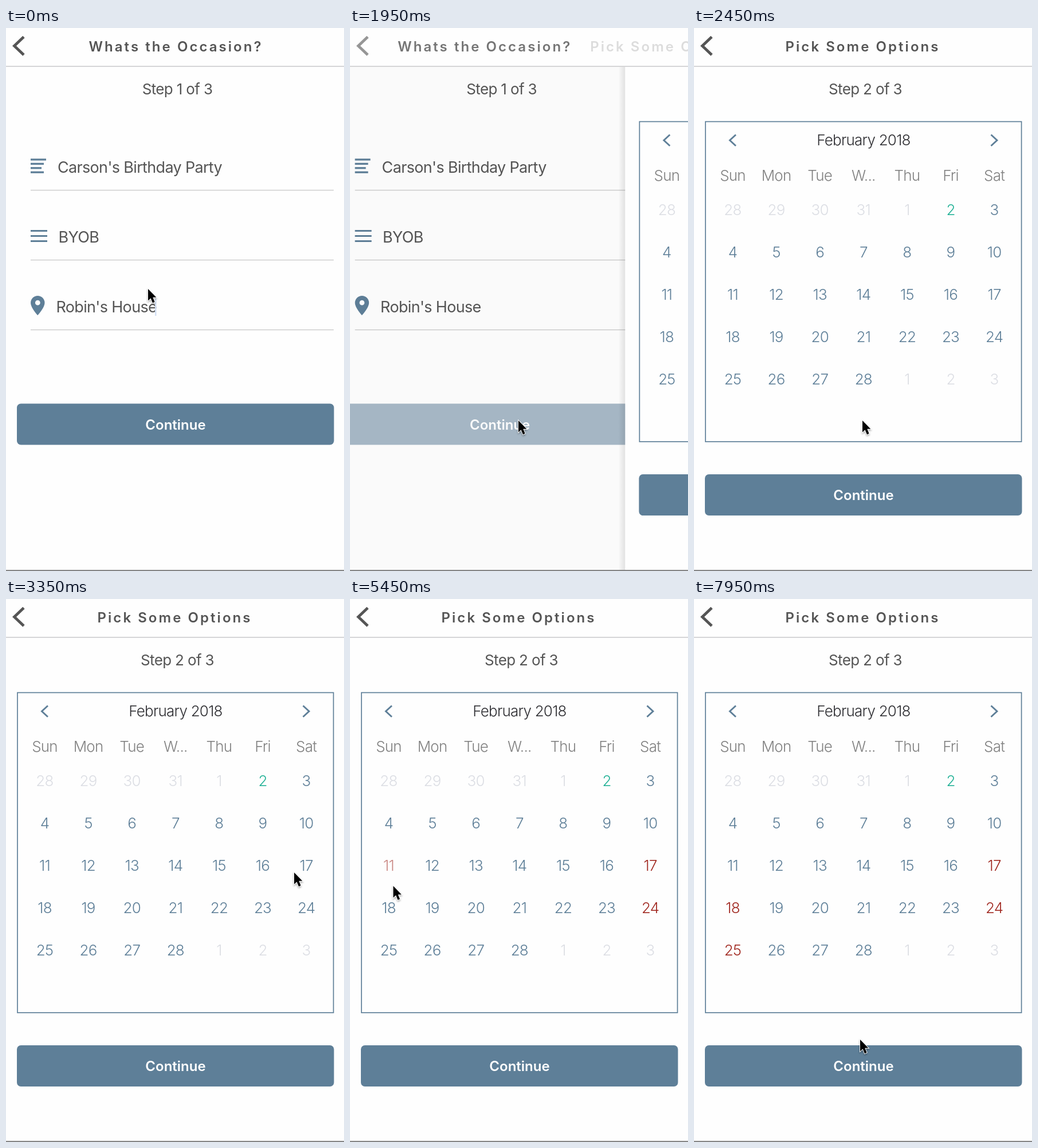
These frames come from a looping animation (590x949 px, 8000 ms). An HTML page:

```html
<!DOCTYPE html>
<html lang="en">
<head>
<meta charset="utf-8">
<title>Event steps</title>
<style>
  html, body { margin: 0; width: 100%; height: 100%; overflow: hidden; background: #fff; }
  svg { display: block; width: 100vw; height: 100vh; }
  text { font: 400 26px Inter, "Open Sans", sans-serif; letter-spacing: -.025em; fill: #555; }
  .mid { text-anchor: middle; }
  .title { font-size: 24px; font-weight: 600; letter-spacing: 3.05px; }
  .field { font-size: 27px; }
  .btn { font-size: 24px; font-weight: 600; letter-spacing: 0; fill: #fff; }
  .cal { font-weight: 300; letter-spacing: -.03em; }
  .line { fill: none; stroke: #5e7f98; }
</style>
</head>
<body>
<svg id="stage" viewBox="0 0 590 949"></svg>
<script>
const BLUE = '#5e7f98', RED = '#a02820', TEAL = '#22b196', PALE = '#dcdee4', PAPER = '#fefefe';
const LOOP = 8000, PAGE = 600, HOLD = 140;

const push = { start: 1818, length: 475 };
const submit = { down: 1450, up: 1837 };
const taps = [[17, 3700], [24, 4270], [11, 5335], [18, 6130], [25, 6885], [11, 7440]]
  .map(([day, up]) => ({ day, up, down: up - HOLD }));

const clamp = v => Math.max(0, Math.min(1, v));
const smooth = v => v * v * (3 - 2 * v);
const quad = v => v < .5 ? 2 * v * v : 1 - 2 * (1 - v) ** 2;

// Ease-in-out built from two mirrored halves of cubic-bezier(.42, 0, 1, 1)
function easeIn(x) {
  let lo = 0, hi = 1;
  for (let i = 0; i < 20; i++) {
    const s = (lo + hi) / 2;
    if (1.26 * (1 - s) ** 2 * s + smooth(s) < x) lo = s; else hi = s;
  }
  return smooth(lo);
}
const ease = x => x < .5 ? easeIn(2 * x) / 2 : 1 - easeIn(2 - 2 * x) / 2;

// Calendar grid: cell 0 is the top left day, the 1st sits in cell 4
const colX = i => 67.5 + 76.1 * (i % 7);
const rowY = i => 318 + 73.8 * Math.floor(i / 7);

// Places where the pointer rests, from `at` to `leave`
const stop = (at, x, y, leave = at) => ({ at, x, y, leave });
const stops = [
  stop(0, 248, 456), stop(330, 296, 668), stop(640, 232, 146),
  stop(1350, 294, 686, 2620), stop(2850, 315, 778), stop(3350, 503, 478),
  ...taps.map(k => stop(k.down, colX(k.day + 3) + 8, rowY(k.day + 3) + 2, k.up + 10)),
  stop(7700, 74, 640), stop(7950, 290, 770)
];

// The pointer sets off at once; longer ways take longer
function pointerAt(t) {
  const i = stops.findLastIndex(s => s.at <= t);
  const a = stops[i], b = stops[i + 1] || a;
  const time = Math.min(b.at - a.leave, 150 + Math.hypot(b.x - a.x, b.y - a.y));
  const s = time > 0 ? smooth(clamp((t - a.leave) / time)) : 0;
  return [a.x + (b.x - a.x) * s, a.y + (b.y - a.y) * s];
}

const text = (s, x, y, cls, extra = '') => `<text x="${x}" y="${y}" class="${cls}" ${extra}>${s}</text>`;
const rect = (x, y, w, h, fill, extra = '') =>
  `<rect x="${x}" y="${y}" width="${w}" height="${h}" fill="${fill}" ${extra}/>`;
const button = (y, id) => rect(19, y, 553.5, 72, BLUE, `rx="7" id="${id}"`) +
  text('Continue', 296, y + 45, 'btn mid');
const stroke = (d, width) => `<path d="${d}" class="line" stroke-width="${width}"/>`;
const bars = (y, step, h, widths) => widths.map((w, i) => rect(43, y + i * step, w, h, BLUE)).join('');

function formPage() {
  const pin = `<path fill="${BLUE}" fill-rule="evenodd" d="M55.3 468a12.2 12.2 0 0 0-12.2 12.2c0 9 12.2 21.8 12.2 21.8
    s12.2-12.8 12.2-21.8a12.2 12.2 0 0 0-12.2-12.2zm0 7.8a4.4 4.4 0 1 1 0 8.8a4.4 4.4 0 0 1 0-8.8z"/>`;
  const fields = ["Carson's Birthday Party", 'BYOB', "Robin's House"]
    .map((s, i) => text(s, [90, 91.5, 87.5][i], 253.3 + 122 * i, 'field') +
      rect(43, 282.8 + 122 * i, 529, 1.4, '#cbcbcb')).join('');
  return rect(0, 68, 780, 881, PAPER) + text('Step 1 of 3', 299, 116.3, 'mid') +
    bars(228.3, 7.4, 3.3, [27, 23, 19, 23]) + bars(353, 9, 3, [29, 29, 29]) + pin + fields +
    rect(260, 473, 2.5, 30, '#d3dff3', 'id="caret"') + button(656.5, 'submit');
}

function calendarPage() {
  const heads = ['Sun', 'Mon', 'Tue', 'W...', 'Thu', 'Fri', 'Sat']
    .map((d, i) => text(d, colX(i), 267.4, 'cal mid', 'style="fill:#808080"')).join('');
  let days = '';
  for (let i = 0; i < 35; i++) {
    const n = i - 3, inMonth = n >= 1 && n <= 28;
    const label = n < 1 ? n + 31 : n > 28 ? n - 28 : n;
    const fill = !inMonth || n === 1 ? PALE : n === 2 ? TEAL : BLUE;
    const id = inMonth ? `id="day${n}"` : '';
    days += text(label, colX(i), rowY(i) + 9.3, 'cal mid', `${id} style="fill:${fill}"`);
  }
  return rect(-17, 68, 12, 881, 'url(#shade)') + rect(-5, 68, PAGE, 881, PAPER) +
    text('Step 2 of 3', 299, 116.3, 'mid') +
    rect(20, 163.6, 551.6, 559.4, 'none', 'class="line" stroke-width="1.7"') +
    stroke('M73 186.5L62.5 196.2L73 206', 2.9) + stroke('M518.5 186.5L529 196.2L518.5 206', 2.9) +
    text('February 2018', 296, 205.4, 'cal mid', 'style="fill:#2f2f33"') +
    heads + days + button(780, 'next');
}

const stage = document.getElementById('stage');
stage.innerHTML = `
  <defs>
    <linearGradient id="shade"><stop offset="0" stop-color="#000" stop-opacity="0"/>
      <stop offset="1" stop-color="#000" stop-opacity=".1"/></linearGradient>
    <clipPath id="bar">${rect(32, 0, 558, 66, '#000')}</clipPath>
    <filter id="soft" x="-50%" y="-50%" width="200%" height="200%">
      <feDropShadow dx="0" dy="2" stdDeviation="1.5" flood-opacity=".35"/></filter>
  </defs>
  <g id="form">${formPage()}</g>
  ${rect(0, 68, 590, 881, '#200020', 'id="dim"')}
  <g id="calendar">${calendarPage()}</g>
  ${rect(0, 0, 590, 67, PAPER)}${rect(0, 66.3, 590, 1.5, '#c9c9cb')}
  <g clip-path="url(#bar)">
    <g id="title1">${text('Whats the Occasion?', 144.5, 41.2, 'title')}</g>
    <g id="title2">${text('Pick Some Options', 159.5, 41.2, 'title')}</g>
  </g>
  <path id="back" d="M31 15.5L14.5 31.3L31 47" fill="none" stroke="#555" stroke-width="4.8"/>
  ${rect(0, 947, 590, 2, '#858585')}
  <path id="pointer" filter="url(#soft)" d="M0 0V20.5L4.6 16.2L8 24.4L11.6 22.8L8.3 14.8H14.4Z"
    stroke="#fff" stroke-width="1.8" paint-order="stroke"/>`;

const el = id => document.getElementById(id);
const move = (id, x, y = 0) => el(id).setAttribute('transform', `translate(${x.toFixed(2)} ${y.toFixed(2)})`);
const fade = (id, v) => el(id).setAttribute('opacity', v.toFixed(3));

// Opacity of a touchable: drops to .2 while held, then recovers
const touch = (t, { down, up }) => t < up
  ? 1 - .8 * quad(clamp((t - down) / 150))
  : .2 + .8 * quad(clamp((t - up) / 250));

function draw(t) {
  const p = ease(clamp((t - push.start) / push.length));
  move('form', -.3 * PAGE * p);
  move('calendar', PAGE * (1 - p) + (p ? 0 : 30));
  fade('dim', .15 * p ** 1.3);
  move('title1', -321 * p);
  fade('title1', 1 - p);
  move('title2', 321 * (1 - p));
  fade('title2', p);
  fade('back', Math.abs(1 - 2 * p));
  fade('submit', touch(t, submit));
  fade('caret', t < 500 ? 1 : 0);

  for (const { day } of taps) {
    const own = taps.filter(k => k.day === day);
    const picked = own.filter(k => t >= k.up).length % 2;
    const last = own.findLast(k => t >= k.down);
    el('day' + day).style.fill = picked ? RED : BLUE;
    fade('day' + day, last ? touch(t, last) : 1);
  }
  move('pointer', ...pointerAt(t));
}

const begin = performance.now();
function tick() {
  draw((performance.now() - begin) % LOOP);
  requestAnimationFrame(tick);
}
draw(0);
requestAnimationFrame(tick);
</script>
</body>
</html>
```
